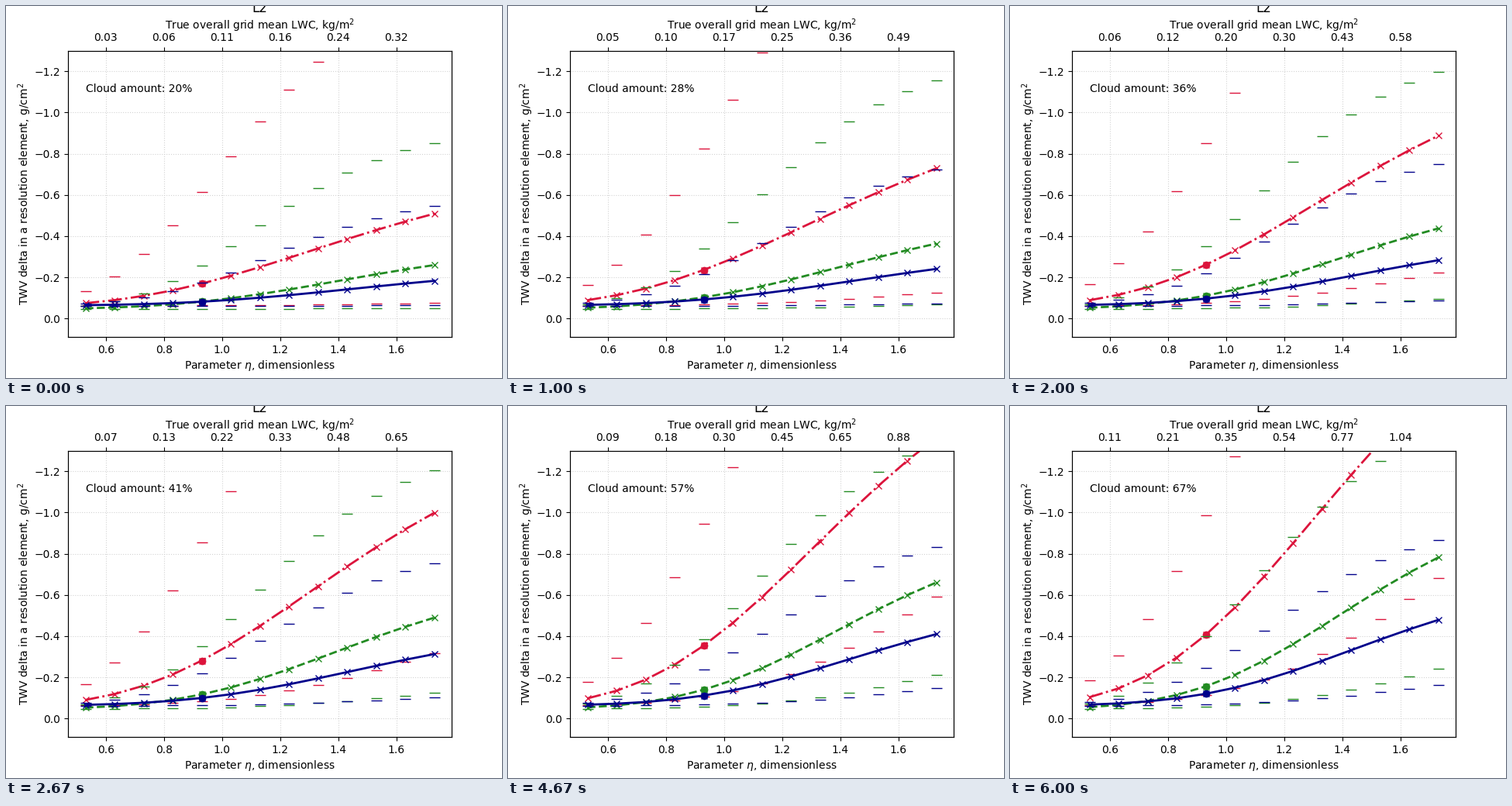
A matplotlib script that plays this animation: 640x480 px, repeating every 6330 ms.

```python
import numpy as np
import matplotlib.pyplot as plt
from matplotlib.animation import FuncAnimation

FRAMES, LOOP_MS = 19, 6330
ETA = 0.53 + 0.1 * np.arange(13)
REFERENCE = 4  # index of the highlighted parameter value
MIDDLE = 1.13
LWC_TICKS = np.arange(0.6, 1.7, 0.2)

# How the liquid water and the extreme values grow over the loop.
KEYS = [0, 3, 6, 8, 11, 14, 18]
WATER = [0.321, 0.492, 0.582, 0.65, 0.76, 0.88, 1.044]
HIGH = [0.6, 0.825, 0.855, 0.86, 0.88, 0.957, 1]
LOW = [0.013, 0.064, 0.158, 0.252, 0.38, 0.523, 0.613]


def s_curve(gain, offset, steepness):
    """Saturating response to the parameter."""
    return gain / (1 + np.exp(-offset - steepness * np.log(ETA / MIDDLE)))


def cloud_amount(step):
    return 0.2 + 0.47 * step / (FRAMES - 1)


class Series:
    """A mean line with bars for the extremes; each curve is (base, gain, offset, steepness)."""

    def __init__(self, ax, color, style, mean, high, low):
        self.mean, self.high, self.low = mean, high, low
        bar = dict(color=color, marker='_', ms=10, ls='none')
        self.high_bars, = ax.plot([], [], **bar)
        self.low_bars, = ax.plot([], [], **bar)
        self.line, = ax.plot([], [], color=color, ls=style, lw=2, marker='x')
        self.dot, = ax.plot([], [], color=color, marker='o', ls='none')

    def update(self, step):
        water, high, low = (np.interp(step, KEYS, v) for v in (WATER, HIGH, LOW))
        # Denser clouds saturate earlier, which flattens the mean.
        extra = 0.4 * water - 1.5 * water / cloud_amount(step)
        base, gain, offset, steepness = self.mean
        mean = -base - water * s_curve(gain, offset, steepness + extra)
        self.line.set_data(ETA, mean)
        self.dot.set_data([ETA[REFERENCE]], [mean[REFERENCE]])
        for bars, scale, (base, *shape) in ((self.high_bars, high, self.high),
                                            (self.low_bars, low, self.low)):
            bars.set_data(ETA, -base - scale * s_curve(*shape))


plt.rcParams['font.family'] = 'DejaVu Sans'
fig, ax = plt.subplots(figsize=(6.4, 4.8), dpi=100)
fig.subplots_adjust(right=0.8985)
ax.set(xlim=(0.47, 1.79), ylim=(0.09, -1.3))
ax.set_title('L2', pad=4.8)
ax.set_xlabel(r'Parameter $\eta$, dimensionless', labelpad=2.7)
ax.set_ylabel('TWV delta in a resolution element, g/cm$^2$', labelpad=1.5)
ax.grid(ls=':', color='lightgray')
top = ax.twiny()
top.set_xlim(ax.get_xlim())
top.set_xlabel('True overall grid mean LWC, kg/m$^2$', labelpad=2.7)
amount = ax.text(0.53, -1.1, '')

series = [
    Series(ax, 'crimson', '-.', mean=(0.055, 2.4, -1.085, 5.67),
           high=(0.055, 3, 0, 4.1), low=(0.062, 2.6, -2.45, 4.7)),
    Series(ax, 'forestgreen', '--', mean=(0.046, 1.1, -1.36, 6.47),
           high=(0.045, 1.57, -0.28, 4.87), low=(0.047, 0.83, -2.75, 5.3)),
    Series(ax, 'darkblue', '-', mean=(0.063, 0.66, -1.52, 6.47),
           high=(0.065, 0.96, -0.5, 4.95), low=(0.062, 0.44, -2.75, 5.3))]


def update(step):
    for item in series:
        item.update(step)
    lwc = np.interp(step, KEYS, WATER) * (LWC_TICKS / 1.6) ** 2.32
    top.set_xticks(LWC_TICKS, [f'{value:.2f}' for value in lwc])
    amount.set_text(f'Cloud amount: {100 * cloud_amount(step):.0f}%')


anim = FuncAnimation(fig, update, frames=FRAMES, init_func=lambda: update(0),
                     interval=LOOP_MS / FRAMES, repeat=True, repeat_delay=0)
plt.show()
```
